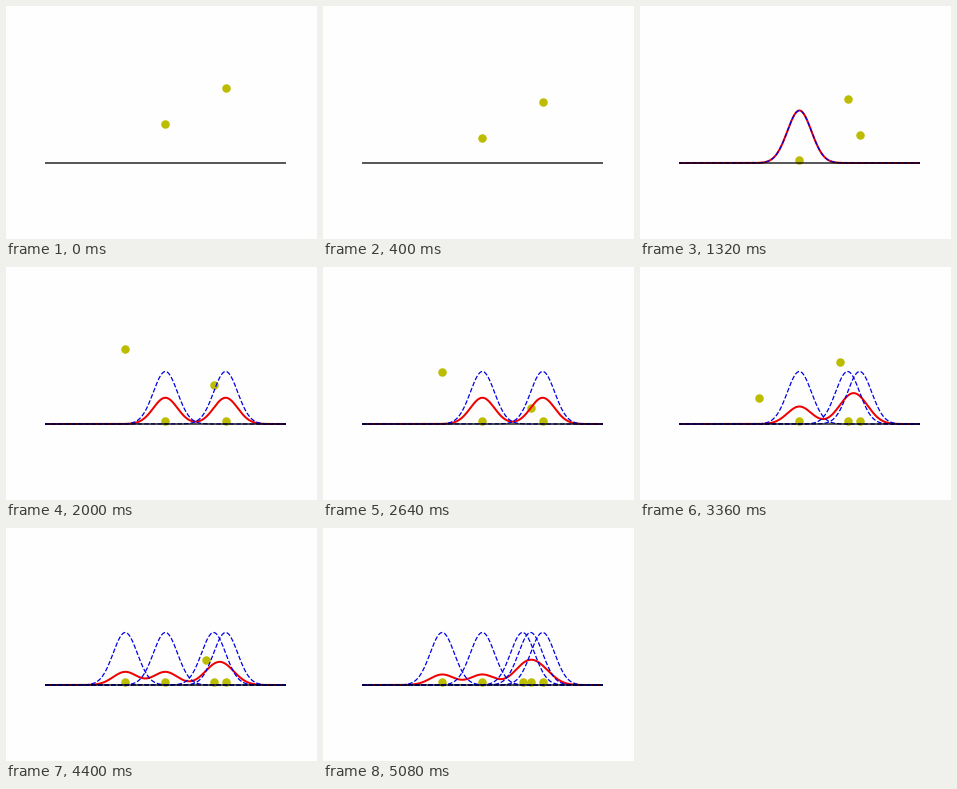
A matplotlib script that plays this animation: 311x233 px, repeating every 6 s.

```python
import numpy as np
import matplotlib.pyplot as plt
from matplotlib.animation import FuncAnimation

W, H = 311, 233
DPI = 72               # one point equals one pixel
BASE = 157             # baseline, pixels from the top
FRAMES, STEP = 150, 40
BEAT = 25              # frames between two landings

SAMPLES = np.array([0, 3, 2.4, -2, 2])
SIGMA = 0.6
PEAK = 52.5
REST, FALL = 3.2, 36   # resting height, drop per beat

x = np.linspace(-6, 6, 601)
kernels = PEAK * np.exp(-0.5 * ((x - SAMPLES[:, None]) / SIGMA) ** 2)

fig = plt.figure(figsize=(W / DPI, H / DPI), dpi=DPI, facecolor="#fefefe")
ax = fig.add_axes([0.125, 0, 0.775, 1])
ax.set_xlim(-6, 6)
ax.set_ylim(BASE - H, BASE)
ax.axis("off")

balls, = ax.plot([], [], "o", ms=8.5, color="#bcbc00", mew=0, snap=False, zorder=1)
density, = ax.plot([], [], color="#f00000", lw=2, zorder=2)
bumps = [ax.plot(x, k, "--", color="#0000e6", lw=1.25, zorder=3)[0] for k in kernels]
ax.plot([-6, 6], [0, 0], color="black", lw=1.3, snap=False, zorder=4)


def update(i):
    beat = i / BEAT
    landing = np.arange(1, len(SAMPLES) + 1)
    left = np.maximum(landing - beat, 0)
    shown = left <= 2
    balls.set_data(SAMPLES[shown], REST + FALL * left[shown])

    landed = min(i // BEAT, len(SAMPLES))
    for k, bump in enumerate(bumps):
        bump.set_visible(k < landed)
    density.set_visible(landed > 0)
    if landed:
        density.set_data(x, kernels[:landed].mean(axis=0))
    return [balls, density, *bumps]


anim = FuncAnimation(fig, update, frames=FRAMES, interval=STEP, repeat=True,
                     repeat_delay=0, blit=False)
plt.show()
```
